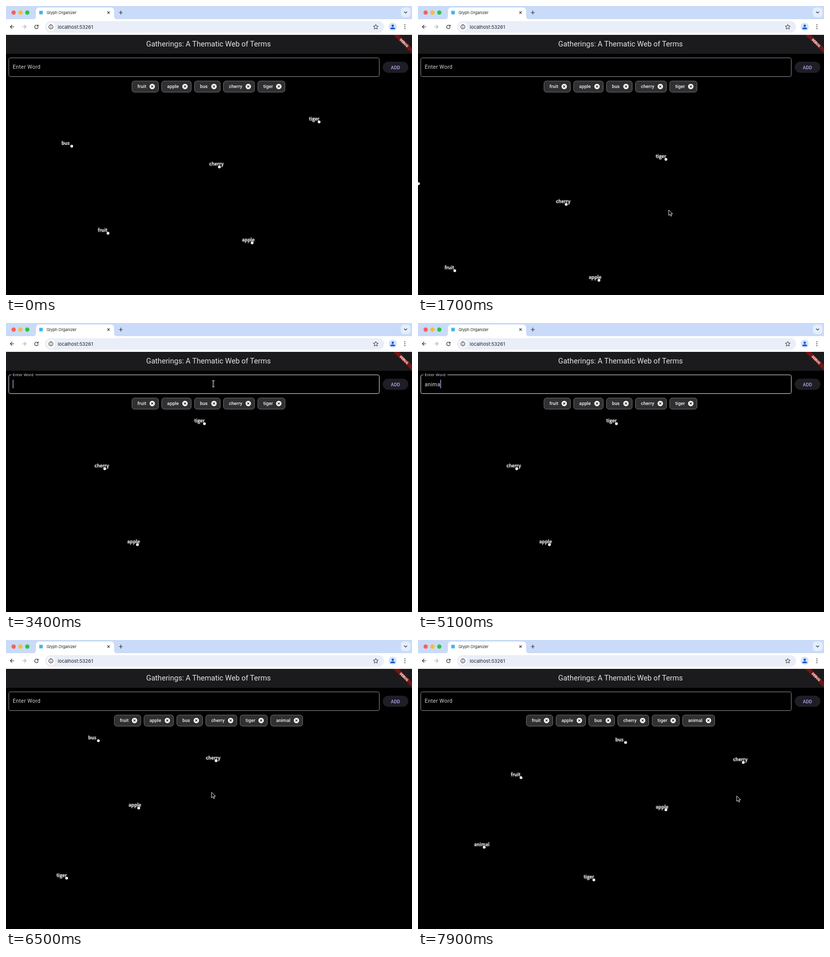
These frames come from a looping animation (800x571 px, 8000 ms). An HTML page:

```html
<!DOCTYPE html>
<html lang="en">
<head>
<meta charset="utf-8">
<title>Word map</title>
<style>
  html, body { margin: 0; width: 100%; height: 100%; overflow: hidden; background: #000; }
  svg { display: block; width: 800px; height: 571px; }
  text { font-family: Roboto, sans-serif; white-space: pre; }
  .chrome { font-family: Inter, sans-serif; fill: #1f2023; }
  .icon { fill: none; stroke: #303134; stroke-width: 1.2; }
  .body { font-size: 10.5px; letter-spacing: .33px; }
  .chip { font-size: 9.2px; font-weight: 500; letter-spacing: .07px; fill: #f0eef2; }
  .word { font: 500 9.17px "Noto Sans CJK JP", "Noto Sans CJK", "Noto Sans", sans-serif;
          letter-spacing: .16px; fill: #fff; stroke: #fff; stroke-width: .25;
          filter: drop-shadow(0 0 1.5px rgba(255,255,255,.5)); }
</style>
</head>
<body>
<svg viewBox="0 0 800 571">
  <defs>
    <clipPath id="mapClip"><rect y="174" width="800" height="397"/></clipPath>
    <clipPath id="pageClip"><rect y="57" width="800" height="514"/></clipPath>
  </defs>
  <rect width="800" height="571"/>

  <g id="map" clip-path="url(#mapClip)"></g>

  <g id="browser">
    <rect width="800" height="27" fill="#c9dbf8"/>
    <rect y="26" width="800" height="31" fill="#fff"/>
    <path d="M52 26.5Q59 26.5 59 20V10Q59 3 66 3H206Q213 3 213 10V20Q213 26.5 220 26.5Z" fill="#fff"/>
    <circle cx="15" cy="13" r="4.2" fill="#fe5f57"/>
    <circle cx="28.5" cy="13" r="4.2" fill="#febc2e"/>
    <circle cx="42" cy="13" r="4.2" fill="#28c840"/>
    <rect x="65.5" y="9.5" width="7" height="7" fill="#42b3f0"/>
    <text class="chrome" x="80" y="15.6" font-size="7.7">Glyph Organizer</text>
    <path class="icon" d="M199.7 10.7l4.6 4.6m0-4.6l-4.6 4.6M222.5 13h7.4m-3.7-3.7v7.4"/>
    <rect x="778" y="3" width="19" height="19" rx="6" fill="#e4edfc"/>
    <path class="icon" d="M784.6 11.3l2.8 2.7 2.8-2.7"/>
    <path class="icon" d="M16 41H8.6m3.6-3.7L8.5 41l3.7 3.7"/>
    <path class="icon" style="stroke:#aaadb2" d="M32 41h7.4m-3.6-3.7l3.7 3.7-3.7 3.7"/>
    <path class="icon" d="M62.8 39.2A3.5 3.5 0 1 0 63.4 42M63.4 37v3h-3"/>
    <rect x="77" y="30" width="668" height="22.5" rx="11.2" fill="#e9eef8"/>
    <circle cx="88.5" cy="41.2" r="8.3" fill="#fff"/>
    <circle class="icon" cx="88.5" cy="41.2" r="4" stroke-width="1"/>
    <path class="icon" d="M88.5 40.6v2.7m0-4.7v1"/>
    <text class="chrome" x="102" y="44.6" font-size="9.4">localhost:53261</text>
    <path class="icon" style="stroke-width:1" stroke-linejoin="round"
      d="M728.6 36.4l1.4 3.2 3.4.3-2.6 2.3.8 3.4-3-1.8-3 1.8.8-3.4-2.6-2.3 3.4-.3z"/>
    <circle cx="762" cy="41" r="8" fill="#d3e3fd"/>
    <circle cx="762" cy="39" r="2.3" fill="#0b57d0"/>
    <path d="M757.3 45.8v-1q0-2.6 4.7-2.6t4.7 2.6v1z" fill="#0b57d0"/>
    <g fill="#303134">
      <circle cx="786" cy="37.3" r="1"/><circle cx="786" cy="41" r="1"/><circle cx="786" cy="44.7" r="1"/>
    </g>
  </g>

  <rect y="57" width="800" height="37.5" fill="#1b1b1d"/>
  <text x="399" y="80.4" font-size="14.6" text-anchor="middle" fill="#e6e1e6">Gatherings: A Thematic Web of Terms</text>
  <g clip-path="url(#pageClip)">
    <g transform="translate(800 57) rotate(45)">
      <rect x="-27" y="18.3" width="54" height="7.9" fill="#741313"/>
      <text y="24.6" font-size="6.6" font-weight="900" text-anchor="middle" fill="#fff">DEBUG</text>
    </g>
  </g>

  <rect id="field" x="5.5" y="102.5" width="730" height="37" rx="3" fill="none"/>
  <rect id="notch" x="10.5" y="101" height="3.6"/>
  <text id="hint" class="body" fill="#d6d2d9">Enter Word</text>
  <text id="typed" class="body" x="13.3" y="124.7" fill="#e6e1e6"></text>
  <rect id="caret" y="112" width="1.3" height="17" fill="#b6a4f0"/>
  <rect x="742.3" y="110" width="50.5" height="22" rx="11" fill="#1f1d25"/>
  <text x="767.4" y="124.5" font-size="9.2" font-weight="500" text-anchor="middle" fill="#baa8f2">ADD</text>

  <g id="chips"></g>

  <path id="arrow" d="M0 0V10.8L2.5 8.5 4.2 12.3 6 11.5 4.3 7.8H7.8Z" fill="#000" stroke="#fff" stroke-width=".9"/>
  <g id="beam" fill="none">
    <path d="M-2-6Q0-6 0-4.5Q0-6 2-6M0-4.5V4.5M-2 6Q0 6 0 4.5Q0 6 2 6M-1.2 1.5h2.4" stroke="#fff" stroke-width="1.9"/>
    <path d="M-2-6Q0-6 0-4.5Q0-6 2-6M0-4.5V4.5M-2 6Q0 6 0 4.5Q0 6 2 6M-1.2 1.5h2.4" stroke="#000" stroke-width=".7"/>
  </g>
</svg>
<script>
const LOOP = 8000, FOCUS = 3200, SUBMIT = 5500, RELAYOUT = 5600, GLIDE = 530;
const KEYS = [4500, 4650, 4750, 4900, 5050, 5250];
const ENTRY = 'animal';

// name, chip width, first position (if any), second position
const WORDS = [
  ['fruit', 53, [201, 449], [202, 298.5]],
  ['apple', 59, [485, 468], [487.5, 362]],
  ['bus', 51.5, [129.5, 277], [408, 229]],
  ['cherry', 62, [420.5, 318], [640, 268.5]],
  ['tiger', 54.5, [617, 229], [345.5, 500.5]],
  ['animal', 64, null, [129.5, 436]]
];

// time, x, y
const PAN = [
  [700, 0, 0], [900, -30, 20], [1200, -112, 66], [1400, -128.5, 74],
  [1750, -128.5, 74], [2000, -175, 25], [2300, -217, -30], [2450, -226, -30],
  [6550, -226, -30], [6700, -150, 5], [6900, -30, 59], [7050, 1, 73],
  [7420, 1, 73], [7900, 1, -26.5]
];
// pointer position relative to the pan
const GRIP = [
  [100, 486, 350], [400, 495, 423], [500, 495, 423], [650, 622.5, 329],
  [2500, 622.5, 329], [3000, 634.5, 150], [6050, 634.5, 150],
  [6450, 631, 331], [7420, 631, 331], [7900, 627, 334.5]
];

const $ = id => document.getElementById(id);
const clamp = v => Math.max(0, Math.min(1, v));
const lerp = (a, b, k) => a + (b - a) * k;
const mix = (p, q, k) => [lerp(p[0], q[0], k), lerp(p[1], q[1], k)];
const show = (el, on) => el.setAttribute('visibility', on ? 'visible' : 'hidden');
const place = (el, x, y, extra = '') => el.setAttribute('transform', `translate(${x} ${y})${extra}`);

function track(table, t) {
  const i = table.findIndex(step => step[0] > t);
  if (i === 0) return table[0].slice(1);
  if (i < 0) return table[table.length - 1].slice(1);
  const a = table[i - 1], b = table[i];
  return mix(a.slice(1), b.slice(1), (t - a[0]) / (b[0] - a[0]));
}

function add(parent, tag, attrs, text = '') {
  const el = document.createElementNS('http://www.w3.org/2000/svg', tag);
  for (const key in attrs) el.setAttribute(key, attrs[key]);
  el.textContent = text;
  return parent.appendChild(el);
}

function makeChip([name, width]) {
  const g = add($('chips'), 'g', {});
  add(g, 'rect', { x: .4, y: 148.2, width: width - .8, height: 22, rx: 5, fill: '#303032', stroke: '#87868a', 'stroke-width': .8 });
  add(g, 'text', { class: 'chip', x: 11.2, y: 162.4 }, name);
  add(g, 'circle', { cx: width - 12.7, cy: 159.1, r: 5.3, fill: '#fff' });
  add(g, 'path', { d: `M${width - 14.8} 157l4.2 4.2m0-4.2l-4.2 4.2`, stroke: '#222', 'stroke-width': 1.1 });
  return g;
}

const items = WORDS.map(word => ({ name: word[0], width: word[1], from: word[2], to: word[3], chip: makeChip(word) }));
for (const item of items) item.label = add($('map'), 'text', { class: 'word' }, item.name);
for (const item of items) item.dot = add($('map'), 'circle', { r: 2.7, fill: '#fff' });

function drawWords(t, [px, py]) {
  const moved = t >= RELAYOUT, k = clamp((t - RELAYOUT) / GLIDE);
  const shown = items.filter(item => moved || item.from);
  const gap = 5.6;
  let x = 399 - (shown.reduce((sum, item) => sum + item.width, 0) + gap * (shown.length - 1)) / 2;
  for (const item of items) {
    const on = shown.includes(item);
    for (const el of [item.chip, item.label, item.dot]) show(el, on);
    if (!on) continue;
    place(item.chip, x, 0);
    x += item.width + gap;
    const [lx, ly] = mix(item.from || item.to, item.to, k);
    const [dx, dy] = moved ? item.to : item.from;
    place(item.label, lx + px - 20, ly + py - 2.6);
    place(item.dot, dx + px, dy + py);
  }
}

function drawField(t, hovered) {
  const focused = t >= FOCUS && t < SUBMIT;
  const lift = clamp((t - FOCUS) / 167) - clamp((t - SUBMIT) / 167);
  $('field').setAttribute('stroke', focused || hovered ? '#dedce0' : '#8e8c92');
  $('notch').setAttribute('width', 47.5 * lift);
  place($('hint'), 13.3, lerp(124.3, 105.3, lift), ` scale(${lerp(1, .75, lift)})`);

  const count = focused ? KEYS.filter(key => key <= t).length : 0;
  const typed = $('typed');
  typed.textContent = ENTRY.slice(0, count);
  const since = t - (count ? KEYS[count - 1] : FOCUS);
  show($('caret'), focused && since % 1000 < 500);
  $('caret').setAttribute('x', 13.3 + (count ? typed.getComputedTextLength() : 0));
}

function render(t) {
  const pan = track(PAN, t), grip = track(GRIP, t);
  const x = pan[0] + grip[0], y = pan[1] + grip[1];
  const hovered = t > 2500 && y > 103 && y < 140;
  const pointer = t >= 100 && (t < KEYS[0] || t > 6050);
  drawWords(t, pan);
  drawField(t, hovered);
  show($('arrow'), pointer && !hovered);
  show($('beam'), pointer && hovered);
  place($('arrow'), x, y);
  place($('beam'), x, y);
}

const start = performance.now();
function tick() {
  render((performance.now() - start) % LOOP);
  requestAnimationFrame(tick);
}
tick();
</script>
</body>
</html>
```
